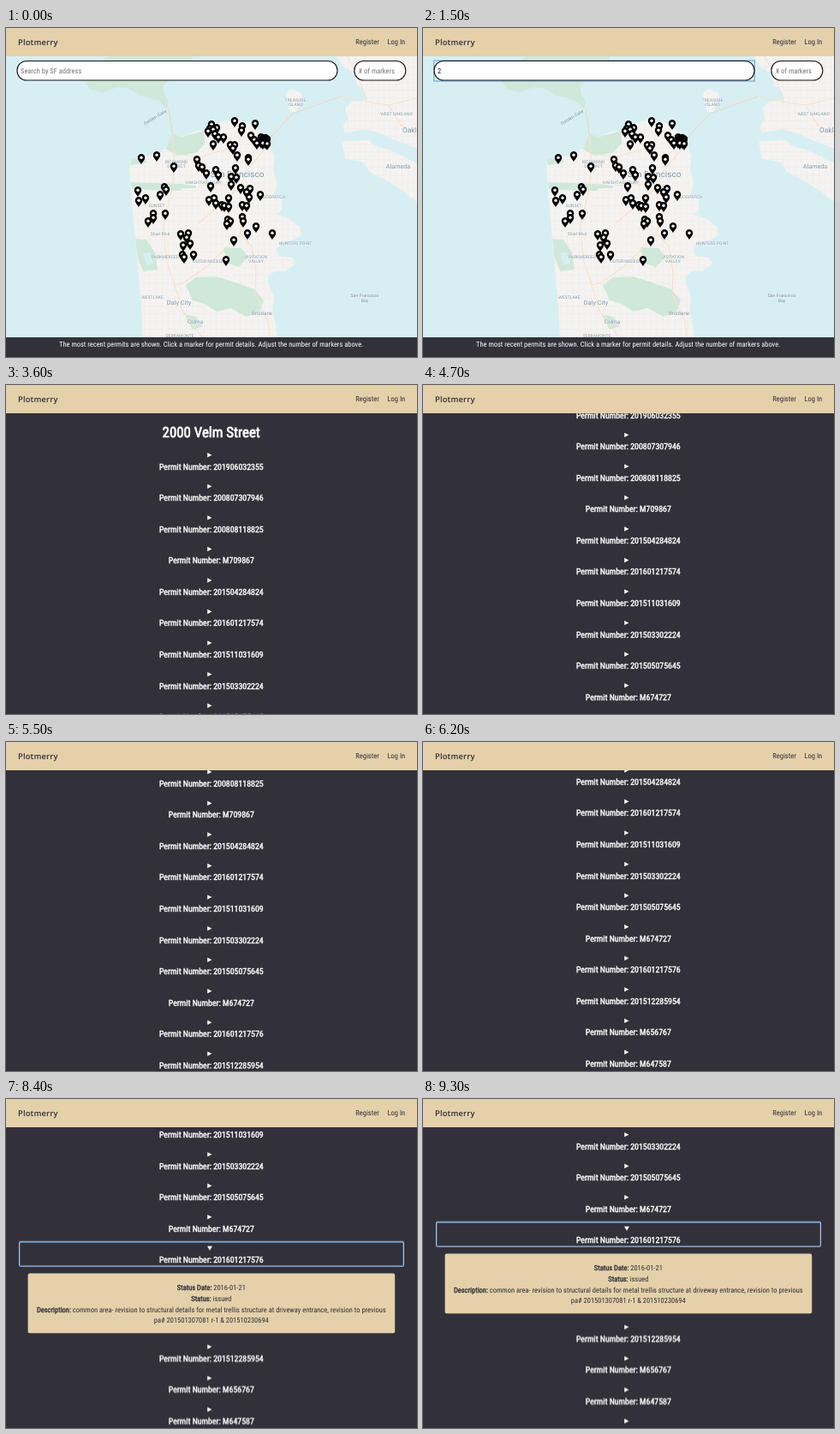
Animation, 480 px wide and 384 px high, one loop 9.5 s. Source, as an HTML page:

```html
<!DOCTYPE html>
<html lang="en">
<head>
<meta charset="utf-8">
<title>Permit map</title>
<style>
  html, body { margin: 0; width: 100%; height: 100%; overflow: hidden; background: #32313a; }
  svg { display: block; width: 480px; height: 384px; }
  text {
    font-family: "Roboto Condensed", Roboto, sans-serif;
    font-stretch: condensed;
    fill: currentColor;
    white-space: pre;
    text-rendering: geometricPrecision;
  }
  .bold { stroke: currentColor; stroke-width: .042em; }
  .brand { font: 600 9.3px "Open Sans", sans-serif; letter-spacing: .2px; }
  .place text { font-family: Roboto, sans-serif; font-stretch: normal; stroke: #fff; stroke-width: .8px; stroke-opacity: .6; paint-order: stroke; }
  .dark { color: #2f2e36; }
  .light { color: #fff; }
  .land { fill: #f5f3f1; }
  .park { fill: #cfe8da; }
  .road { fill: none; stroke: #f5e2cd; stroke-width: 1.2; }
  .field { fill: #fff; stroke: #111; stroke-width: 1.1; }
</style>
</head>
<body>
<svg viewBox="0 0 480 384">
  <defs>
    <pattern id="streets" width="7" height="9" patternUnits="userSpaceOnUse">
      <path d="M0 .5H7M.5 0V9" stroke="#eeebea" stroke-width=".6"/>
    </pattern>
    <path id="city" d="M144 154L160 150 178 148 188 138 194 123 206 127 220 121 232 119 243 113 265 106 284 111 299 121 308 135 313 150 312 166 316 181 313 195 322 200 322 212 316 218 330 222 343 232 345 242 334 248 322 250 316 258 318 266 334 268 338 275 326 284 314 284 306 290 307 300 313 314 311 328 314 342 318 364H160L158 320 155 290 152 260 149 225 146 190Z"/>
    <path id="east" d="M386 33L394 45 405 52 410 66 420 76 422 84 404 86 396 94 400 106 393 115 396 122 420 118 440 124 462 134 480 140V33Z"/>
    <path id="island" d="M392 132L424 131 430 137 450 143 480 158V203L465 191 448 180 425 168 418 157 396 152Z"/>
    <clipPath id="cityClip"><use href="#city"/></clipPath>
    <g id="pin">
      <path d="M0 7.3C-.9 4.4-4.2 2.9-4.2-.7A4.2 4.2 0 0 1 4.2-.7C4.2 2.9.9 4.4 0 7.3Z"/>
      <circle r="1.7" cy="-.8" fill="#fff"/>
    </g>
  </defs>

  <rect width="480" height="384" fill="#32313a"/>
  <g id="list" class="light"></g>

  <g id="mapPage">
    <rect y="33" width="480" height="330" fill="#d7eff3"/>
    <path class="park" d="M92 62L98 72 112 75 122 72 130 69 144 71 155 79 170 82 181 87 188 95 190 86 184 76 184 67 191 61 204 50 217 40 218 33H120L106 44Z"/>
    <g class="land">
      <use href="#city"/><use href="#east"/><use href="#island"/>
      <path d="M327 76L333 71 345 76 347 84 342 90 339 99 332 97 328 86Z"/>
    </g>
    <g fill="url(#streets)">
      <use href="#city"/><use href="#east"/><use href="#island"/>
    </g>
    <g clip-path="url(#cityClip)">
      <g class="park">
        <path d="M146 180L205 182 222 184V187H205L203 190 147 188Z"/>
        <path d="M186 141L194 122 206 127 231 120 232 135 222 146 200 149Z"/>
        <path d="M151 246L164 247 174 262 177 282 160 284 153 265Z"/>
        <path d="M254 256L275 257 283 267 272 279 258 274Z"/>
        <path d="M210 300L222 291 245 290 265 296 290 305 301 318 296 332 281 337 262 327 246 331 232 322 218 318Z"/>
        <path d="M208 334L222 337 230 348 218 352Z"/>
        <path d="M144 152L159 150 165 157 146 160Z"/>
      </g>
      <path d="M160 263L168 262 172 275 164 277Z" fill="#d7eff3"/>
      <path class="road" d="M194 122L196 150 195 185 184 230 187 270 197 300 206 330 231 364M308 135L282 165 272 187 276 212 274 240 262 252 235 278 207 298 196 300M274 240L287 255 292 285 291 311 306 342 308 364M195 146L225 151 268 138M225 184L270 182M270 188L245 211 225 228"/>
    </g>
    <path class="road" d="M190 92L194 124M306 130L335 100 360 88 391 80 421 86 447 90 480 82M421 86L413 61 399 33M447 90L461 113 480 125"/>
    <path d="M190 94L194 123M308 129L335 100 391 80" fill="none" stroke="#c5d5d7" stroke-width=".6"/>
    <g id="places" class="place"></g>
    <g id="pins"></g>

    <rect id="focus" x="12.8" y="38" width="374.4" height="24" fill="none" stroke="#4f86bd" stroke-width=".8"/>
    <rect class="field" x="13" y="38.5" width="374" height="22.5" rx="11"/>
    <rect class="field" x="406.8" y="38.5" width="60" height="22.5" rx="11"/>
    <g id="fields"></g>
    <g id="hints" class="dark"><rect x="13" y="62" width="373.6" height="19.3" fill="#fff"/></g>
    <rect y="361" width="480" height="23" fill="#32313a"/>
    <g id="footer" class="light"></g>
  </g>

  <g id="header" class="dark">
    <rect width="480" height="33" fill="#e4d0a9"/>
    <text class="brand" x="14" y="19.6">Plotmerry</text>
  </g>
</svg>

<script>
const LOOP = 9500, BASE = 8.45, ROW = 36.55;
const $ = id => document.getElementById(id);

function add(parent, tag, attrs = {}) {
  const el = document.createElementNS('http://www.w3.org/2000/svg', tag);
  for (const key in attrs) el.setAttribute(key, attrs[key]);
  return parent.appendChild(el);
}

// Narrow the regular face only where no condensed face is installed.
const ctx = document.createElement('canvas').getContext('2d');
const widthIn = font => {
  ctx.font = font;
  return ctx.measureText('Permit Number: 0123456789').width;
};
const ratio = widthIn('condensed 100px "Roboto Condensed", Roboto, sans-serif') / widthIn('100px Roboto, sans-serif');
const squeeze = ratio > .95 ? .875 : 1;

// Pieces of text alternate regular, bold, regular...
function label(parent, x, y, pieces, { size = BASE, anchor = 'start', color } = {}) {
  const el = add(parent, 'text', {
    transform: `translate(${x} ${y}) scale(${squeeze} 1)`, 'font-size': size, 'text-anchor': anchor
  });
  if (color) el.style.color = color;
  [].concat(pieces).forEach((piece, i) => {
    if (piece) add(el, 'tspan', i % 2 ? { class: 'bold' } : {}).textContent = piece;
  });
  return el;
}

function track(el, steps) {
  const frames = steps.map(([t, style]) => ({ offset: Math.max(0, t - 4) / LOOP, easing: 'step-end', ...style }));
  el.animate(frames, { duration: LOOP, iterations: Infinity });
}
function show(el, from, to = LOOP) {
  const steps = [[0, { opacity: from ? 0 : 1 }]];
  if (from) steps.push([from, { opacity: 1 }]);
  if (to < LOOP) steps.push([to, { opacity: 0 }]);
  track(el, steps);
}

// Header and footer
label($('header'), 408.3, 19.2, 'Register');
label($('header'), 445.6, 19.2, 'Log In');
label($('footer'), 239.7, 372.2, 'The most recent permits are shown. Click a marker for permit details. Adjust the number of markers above.', { anchor: 'middle' });

// Map labels
const place = (text, x, y, size = 5.1, color = '#7f97a5') => {
  const el = add($('places'), 'text', { x, y, 'font-size': size, 'text-anchor': 'middle' });
  el.style.color = color;
  el.textContent = text;
  return el;
};
place('San Francisco', 270, 174, 10, '#7593a5');
place('Daly City', 202, 323, 7.4);
place('Brisbane', 299, 335, 6.2);
place('Colma', 221, 345, 6.4);
place('Oakland', 478, 122, 8.2, '#7593a5');
place('Alameda', 458, 164, 7.2);
place('TREASURE', 338, 86);
place('ISLAND', 338, 91);
place('WEST OAKLAND', 456, 102);
place('RICHMOND', 199, 158);
place('DISTRICT', 199, 163);
place('HAIGHT-ASHBURY', 231, 182);
place('SUNSET', 176, 209);
place('DOGPATCH', 313, 199);
place('Sloat Blvd', 180, 242);
place('PARKMERCED', 186, 269);
place('OUTER MISSION', 237, 274);
place('VISITATION', 292, 269);
place('VALLEY', 292, 274);
place('HUNTERS POINT', 338, 253);
place('WESTLAKE', 171, 316);
place('SERRAMONTE', 203, 361);
place('San Francisco', 419, 314, 5.3, '#6b8796');
place('Bay', 419, 319.5, 5.3, '#6b8796');
place('Golden Gate', 174, 106, 5.5, '#6b8796').setAttribute('transform', 'rotate(-31 174 104)');

// Map pins, by district
const north = [267,109, 291,112, 276,115, 275,120, 286,126, 254,128, 242,136, 262,137, 267,137, 265,141,
  270,149, 283,152, 283,154, 290,131, 293,135, 223,154, 225,161, 229,163, 234,170, 245,166, 248,172, 268,164];
const west = [158,152, 176,149, 196,162, 154,190, 155,202, 163,199, 180,195, 185,186, 187,189,
  172,217, 186,217, 172,222, 166,226, 204,241, 213,240, 211,245, 207,254, 215,252, 206,265, 208,268, 219,265];
const south = [239,185, 263,174, 269,175, 263,183, 274,187, 281,192, 285,188, 284,198, 297,195,
  237,201, 243,199, 245,205, 252,207, 260,199, 255,208, 260,209, 259,224, 258,229, 262,226, 276,207, 281,208,
  276,221, 277,226, 292,232, 282,240, 311,240, 266,248, 257,271];
const pins = [];
for (const spots of [north, west, south])
  for (let i = 0; i < spots.length; i += 2) pins.push([spots[i], spots[i + 1]]);
for (let i = 0; i < 12; i++) pins.push([298 + i * 5 % 8, 128 + i * .7]);
[121, 118, 113, 119, 124, 117, 128].forEach((y, i) => pins.push([236 + i * 2, y]));
pins.sort((a, b) => a[1] - b[1]);
for (const [x, y] of pins) add($('pins'), 'use', { href: '#pin', x, y });

// Search field
const fields = $('fields');
label(fields, 411.5, 52.8, '# of markers', { color: '#757575' });
show(label(fields, 17, 52.8, 'Search by SF address', { color: '#757575' }), 0, 1500);
show(label(fields, 17, 52.8, '2', { color: '#111' }), 1500, 1800);
show(label(fields, 17, 52.8, '20', { color: '#111' }), 1800, 2100);
show(label(fields, 17, 52.8, '200', { color: '#111' }), 2100);
show($('focus'), 1100);

const hint = (x, y, ...pieces) => label($('hints'), x, y, pieces, { size: 6.87 });
hint(31, 69.5, '200', '0 Velm Street, San Ferrandino, CA, USA');
hint(154, 69.5, '200', ' Luis Cardenoso Avenue, San Bela, CA, USA');
hint(291, 69.5, '200', ' Fenn Road, Callowby, CA,');
hint(81, 79.7, '', 'USA');
hint(100, 79.7, '200', ' Birk Road, San Bela, CA, USA');
hint(203.5, 79.7, '200', '0 Harrowby Street, Elmwick, CA, USA');
show($('hints'), 2300);
show($('mapPage'), 0, 3600);

// Permit list
const list = $('list');
label(list, 239.7, 61.3, ['', '2000 Velm Street'], { size: 2 * BASE, anchor: 'middle' });
const tail = add(list, 'g');
const OPEN = 10;
const permits = ['201906032355', '200807307946', '200808118825', 'M709867', '201504284824', '201601217574',
  '201511031609', '201503302224', '201505075645', 'M674727', '201601217576', '201512285954',
  'M656767', 'M647587', 'M640213'];
const shut = 'M235.2 -16.1L240.4 -13.4 235.2 -10.7Z';
const opened = 'M235 -16L241 -16 238 -10.9Z';

permits.forEach((number, i) => {
  const row = add(i > OPEN ? tail : list, 'g', { transform: `translate(0 ${95.2 + i * ROW})` });
  label(row, 239.8, 3.5, ['', 'Permit Number: ' + number], { size: 1.17 * BASE, anchor: 'middle' });
  const arrow = add(row, 'path', { d: shut, fill: '#fff' });
  if (i !== OPEN) return;

  show(arrow, 0, 7300);
  show(add(row, 'path', { d: opened, fill: '#fff' }), 7300);
  show(add(row, 'rect', { x: 15.6, y: -21, width: 448.8, height: 28.4, rx: 1.5, fill: 'none', stroke: '#9cc5f2', 'stroke-width': 1.3 }), 7200);

  const panel = add(row, 'g', { class: 'dark' });
  add(panel, 'rect', { x: 25.6, y: 15.8, width: 428.6, height: 70, rx: 2.2, fill: '#e4d0a9' });
  [
    ['', 'Status Date:', ' 2016-01-21'],
    ['', 'Status:', ' issued'],
    ['', 'Description:', ' common area- revision to structural details for metal trellis structure at driveway entrance, revision to previous'],
    ['pa# 201501307081 r-1 & 201510230694']
  ].forEach((line, n) => label(panel, 239.8, 35.3 + n * 12.75, line, { anchor: 'middle' }));
  show(panel, 7300);
});
track(tail, [[0, { transform: 'translateY(0px)' }], [7300, { transform: 'translateY(78.4px)' }]]);

// Three flicks of momentum scrolling: start, end, distance
const flicks = [[4300, 5300, 115], [5400, 6300, 80], [7770, 8900, 101]];
const glide = p => 1 - (1 - p) ** 3 * (1 + 3 * p);
const scrollAt = t => Math.round(flicks.reduce(
  (sum, [from, to, by]) => sum + by * glide(Math.min(1, Math.max(0, (t - from) / (to - from)))), 0));
const scroll = [];
for (let t = 0; t < LOOP; t += 100) scroll.push([t, { transform: `translateY(${-scrollAt(t)}px)` }]);
track(list, scroll);
</script>
</body>
</html>
```
